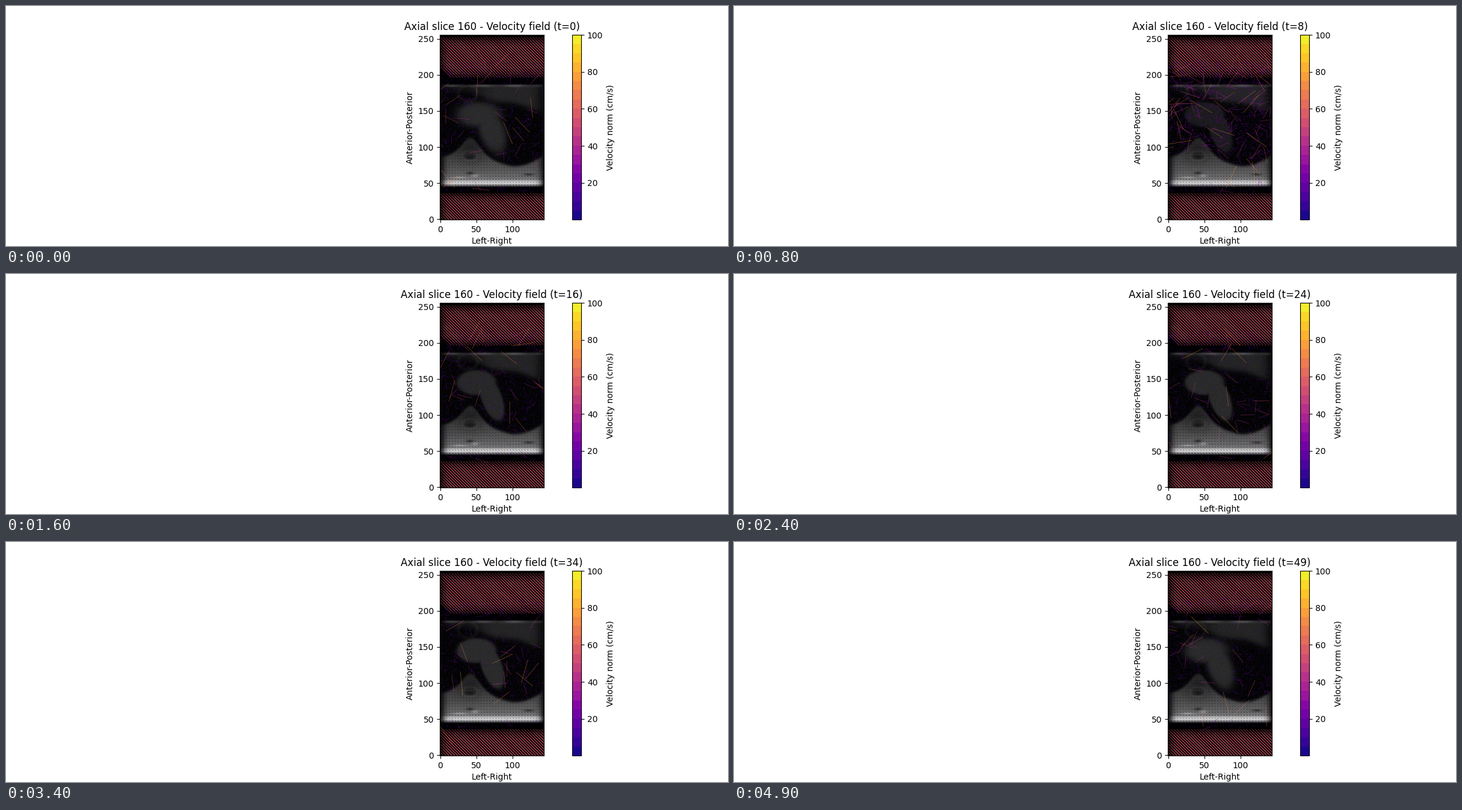
Recreate the animation shown at these times as a matplotlib script. Size 1200x400 px, loop 5 s.

```python
import numpy as np
import matplotlib.pyplot as plt
from matplotlib.animation import FuncAnimation
from matplotlib.cm import ScalarMappable
from matplotlib.collections import LineCollection
from matplotlib.colors import ListedColormap, Normalize

FRAMES, INTERVAL = 50, 100
W, H = 1200, 400
NX, NY, STEP = 144, 256, 4
ARROW = 0.42         # drawn length per cm/s
plasma = plt.get_cmap("plasma")
y, x = np.mgrid[0:NY, 0:NX].astype(float)


def soft(d, w=1.0):
    """Smooth step from 0 to 1 around d = 0."""
    return 1 / (1 + np.exp(-np.clip(d / w, -40, 40)))


def bell(d, w):
    return np.exp(-(d / w) ** 2)


def blob(cx, cy, rx, ry):
    return bell(x - cx, rx) * bell(y - cy, ry)


def ellipse(cx, cy, rx, ry, tilt=0.0, edge=0.06):
    c, s = np.cos(tilt), np.sin(tilt)
    u, v = x - cx, y - cy
    r = np.hypot((u * c + v * s) / rx, (v * c - u * s) / ry)
    return soft(1 - r, edge)


def sides(w):
    return soft(x - w, w / 2) * soft(NX - w - x, w / 2)


def make_back():
    """Back muscles with the bulge of the spine."""
    top = (70 + .1 * np.maximum(97 - x, 0) + .0085 * np.maximum(x - 97, 0) ** 2
           + 37 / (1 + ((x - 42) / 19) ** 2))
    tone = .12 + .42 * np.exp(-np.maximum(y - 46, 0) / 32) + .34 * bell(y - 51, 3)
    img = tone * sides(5) * soft(top - y) * soft(y - 46, .5)
    img *= 1 - .45 * blob(41, 95, 17, 16)
    img += .04 * bell(np.hypot((x - 41) / 1.5, y - 88) - 7, 1.5)
    img *= 1 - .55 * (blob(41, 64, 5, 2) + blob(122, 62, 7, 1.5) + blob(41, 86, 7, 2.5))
    return img + .18 * (blob(27, 58, 10, 1.3) + blob(48, 60, 5, 2))


def make_front():
    """Chest wall: a thin bright line above a dim muscle."""
    low = 178 - 16 * soft(x - 58, 8) - 15 * soft(x - 122, 9)
    img = .13 * sides(8) * (.5 + .5 * soft(x - 58, 6))
    img *= soft(y - low, 2) * soft(186.5 - y, .6)
    img += .2 * bell(y - 185, 1.6) * sides(5) * (.65 + .35 * np.cos(x / 7 - 2))
    ring = np.hypot((x - 38) / 1.2, y - 174)
    return img + .04 * bell(ring - 11, 2) * (y < 186)


def make_heart(grow, edge):
    upper = ellipse(50 + grow, 145, 27 + grow, 17, 0, edge)
    lower = ellipse(71, 123, 14 + grow, 32, .35, edge)
    return np.maximum(upper, lower)


back, front = make_back(), make_front()
heart, wide = make_heart(0, .05), make_heart(3, .12)
under_back = soft(back - .08, .01)

# Sample points of the velocity field, sorted by region
gy, gx = [g.ravel() for g in np.mgrid[0:NY:STEP, 0:NX:STEP]]
outside = (gy >= 212) | (gy <= 36)
in_back = (back[gy, gx] > .08) & ~outside
in_body = (front[gy, gx] > .05) | (heart[gy, gx] > .5)
moving = (gy > 36) & (gy < 220) & ~in_back


def segments(px, py, dx, dy):
    start = np.c_[px, py]
    return np.stack([start, start + np.c_[dx, dy]], axis=1)


def activity(t):
    return np.clip((t - 3) / 5, 0, 1) * np.exp(-max(t - 8, 0) / 5)


def slice_image(t):
    rng = np.random.default_rng(900 + t)
    near = bell(min(t, FRAMES - t), 3)
    shape = near * wide + (1 - near) * heart
    glow = .155 * (1 - .4 * activity(t)) * (1 - under_back)
    grain = .03 * rng.random((NY, NX)) * (y > 47) * (y < 186)
    return np.clip(back + front + glow * shape + grain, 0, 1)


def flow(t):
    rng = np.random.default_rng(40 + t)
    act = activity(t)
    n = gx.size
    burst = rng.random(n) < .06 + .09 * act
    mag = np.where(burst, 12 + 68 * rng.random(n) ** 2.5,
                   rng.exponential(5 + 4 * act, n))
    mag = np.where(in_body, mag * (.25 + .6 * act), mag)
    angle = rng.uniform(0, 2 * np.pi, n)
    mag, angle = mag[moving], angle[moving]
    reach = ARROW * mag
    segs = segments(gx[moving], gy[moving],
                    reach * np.cos(angle), reach * np.sin(angle))
    return segs, plasma(mag / 100)


fig = plt.figure(figsize=(W / 100, H / 100), dpi=100, facecolor="white")
ax = fig.add_axes([721.0 / W, 44 / H, 173.25 / W, 308 / H])
cax = fig.add_axes([940.7 / W, 44 / H, 15.4 / W, 308 / H])

picture = ax.imshow(slice_image(0), cmap="gray", vmin=0, vmax=1,
                    origin="lower", aspect="auto")
ax.set_xlabel("Left-Right")
ax.set_ylabel("Anterior-Posterior")
title = ax.set_title("")

bands = plasma((np.arange(20) + .5) / 20)
bar = fig.colorbar(ScalarMappable(Normalize(.24, 100), ListedColormap(bands)),
                   cax=cax, ticks=range(20, 101, 20))
bar.set_label("Velocity norm (cm/s)")


def add_lines(segs, width, alpha, color="none"):
    lines = LineCollection(segs, colors=color, linewidths=width, alpha=alpha)
    return ax.add_collection(lines, autolim=False)


# Constant vectors where there is no signal, tiny ones in still tissue
add_lines(hatch := segments(gx[outside], gy[outside], 15.5, -15.5),
          .55, .62, plasma(.56))
tiny = 1 + 1.4 * np.exp(-(gy[in_back] - 48) / 20)
add_lines(segments(gx[in_back], gy[in_back], tiny, -.5 * tiny),
          .45, .75, "#0a0420")
arrows = add_lines([], .32, .75)
ax.set_xlim(-.5, NX - .5)
ax.set_ylim(-.5, NY - .5)


def draw(t):
    picture.set_data(slice_image(t))
    segs, colors = flow(t)
    arrows.set_segments(segs)
    arrows.set_color(colors)
    title.set_text(f"Axial slice 160 - Velocity field (t={t})")
    return picture, arrows, title


anim = FuncAnimation(fig, draw, frames=FRAMES, interval=INTERVAL,
                     repeat=True, repeat_delay=0, blit=False)
plt.show()
```
